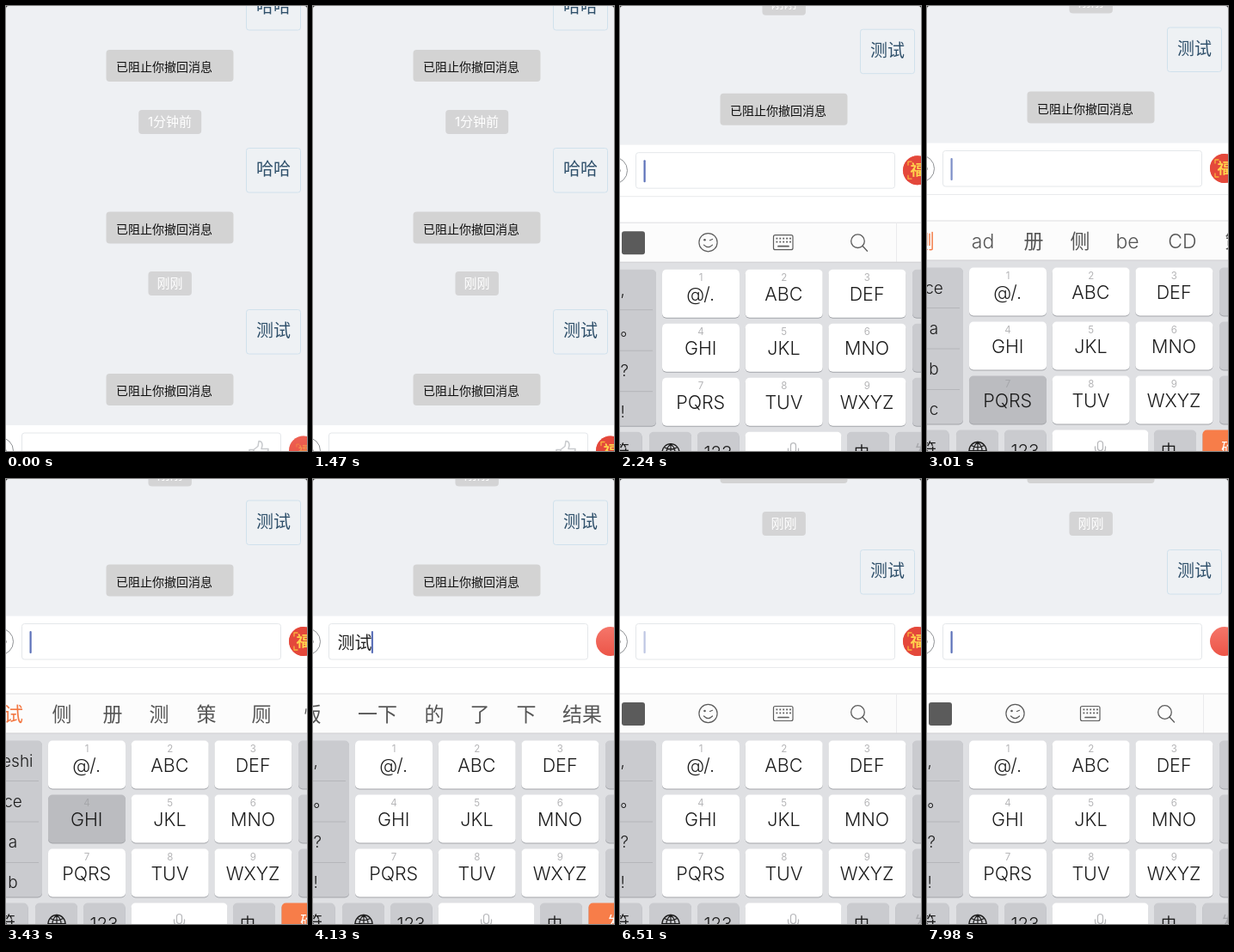
These frames come from a looping animation (350 px wide and 518 px high, 8000 ms). An HTML page:

```html
<!DOCTYPE html>
<html lang="zh-CN">
<head>
<meta charset="utf-8">
<style>
html, body { margin: 0; width: 100%; height: 100%; overflow: hidden; background: #eef0f3; }
svg { display: block; width: 350px; height: 518px; font-family: Inter, "Noto Sans CJK SC", "Noto Sans CJK", sans-serif; }
</style>
</head>
<body>
<svg id="stage" viewBox="0 0 350 518"></svg>
<script>
const LOOP = 8000, FOCUS = 1900, SELECT = 3850, TOOLBAR = 5080, SEND = 5480;
const KEYBOARD_RISE = 328.5, MESSAGE_RISE = 131.5, GLYPH_PERIOD = 3850;
const KEYS = ['@/.', 'ABC', 'DEF', 'GHI', 'JKL', 'MNO', 'PQRS', 'TUV', 'WXYZ'];
const PRESSES = [[2600, 1], [2800, 2], [2990, 6], [3190, 3], [3400, 3]];
const PUNCTUATION = [',', '。', '?', '!'];
const WORD_X = [-3, 65, 124, 178, 233, 297, 358];
const PREDICTIONS = [['版', -2], ['一下', 75], ['的', 141], ['了', 194], ['下', 248], ['结果', 313]];
// Candidate words and side column for each stage of composing
const COMPOSING = [
  { start: 2600, words: ['啊', 'a', '不', '吧', 'b', '才', '次'], side: ['a', 'b', 'c', '2'] },
  { start: 2800, words: ['测', 'ad', '册', '侧', 'be', 'CD', '策'], side: ['ce', 'a', 'b', 'c'] },
  { start: 3100, words: ['测', '册', '侧', '策', '厕', '恻', '側'], side: ['ces', 'ce', 'a', 'b'] },
  { start: 3190, words: ['测试', '侧', '册', '测', '策', '厕', '恻'], side: ['ceshi', 'ce', 'a', 'b'] },
];

const clamp = v => Math.max(0, Math.min(1, v));
const easeOut = (t, start, length) => 1 - (1 - clamp((t - start) / length)) ** 3;
const rect = (x, y, w, h, r, fill, extra = '') =>
  `<rect x="${x}" y="${y}" width="${w}" height="${h}" rx="${r}" fill="${fill}" ${extra}/>`;
const circle = (x, y, r, fill, extra = '') => `<circle cx="${x}" cy="${y}" r="${r}" fill="${fill}" ${extra}/>`;
const path = (d, color, width = 1.3) =>
  `<path d="${d}" fill="none" stroke="${color}" stroke-width="${width}" stroke-linecap="round" stroke-linejoin="round"/>`;
const text = (s, x, y, size, fill, weight = 400, anchor = 'middle') =>
  `<text x="${x}" y="${y}" font-size="${size}" fill="${fill}" font-weight="${weight}" text-anchor="${anchor}">${s}</text>`;
const shift = (y, content) => `<g transform="translate(0 ${y})">${content}</g>`;

const bubble = (s, y) =>
  rect(279.5, y + .5, 63, 51.5, 3, '#eef1f4', 'stroke="#d0e1ec"') + text(s, 311, y + 32, 20, '#2f506b', 350);
const notice = y =>
  rect(116.5, y, 148, 37, 4, '#d3d3d3') + text('已阻止你撤回消息', 128, y + 25, 14, '#111', 400, 'start');
const timeLabel = (s, y, w) =>
  rect(190.7 - w / 2, y, w, 28, 4, '#d4d4d5') + text(s, 190.5, y + 19.3, 15, '#fff');

function chat(t) {
  let out = bubble('哈哈', -24) + notice(51) + timeLabel('1分钟前', 121, 73) + bubble('哈哈', 165)
    + notice(239.5) + timeLabel('刚刚', 309, 50.5) + bubble('测试', 353) + notice(428);
  if (t >= SEND) out += timeLabel('刚刚', 498, 50.5) + bubble('测试', 542);
  return out;
}

function luckyButton(t) {
  const phase = (t - 280 + GLYPH_PERIOD) % GLYPH_PERIOD;
  const shown = Math.min(clamp((phase - 400) / 350), clamp((3760 - phase) / 400));
  return circle(346, 189, 17, 'url(#red)') + circle(346, 189, 17, '#e4483b', `opacity="${shown}"`)
    + `<g transform="translate(346 189) scale(${.5 + .5 * shown})" opacity="${shown}">`
    + text('福', 0, 6.2, 17, '#ffd34d', 700)
    + path('M-11 -6V-10H-7M-11 6V10H-7M7 -10H11V-6M7 10H11V6', '#f9b13c') + '</g>';
}

function cursor(t, x) {
  const reset = t < SELECT ? FOCUS : t < SEND ? SELECT : SEND;
  const phase = (t - reset + 50) % 1000;
  const alpha = Math.min(clamp(phase / 200), clamp((800 - phase) / 150));
  return rect(x, 177, 2.2, 26, 1, '#5d72b9', `opacity="${alpha}"`);
}

function inputBar(t) {
  const typed = t >= SELECT && t < SEND;
  let out = rect(0, 159.5, 350, 90.5, 0, '#fff') + rect(0, 219, 350, 1, 0, '#e9eaec')
    + rect(18.5, 168.5, 301, 41.5, 3, '#fff', 'stroke="#e4e7ea"')
    + circle(-7, 189.3, 15.5, '#fff', 'stroke="#8f9295"') + path('M-1.5 187Q1.5 189.3 -1.5 192', '#777')
    + luckyButton(t);
  if (t < FOCUS) out += path('M283 188H288V202H283ZM288 188L293 184L294 178Q298 178 298 183L297 187H305L303 202H288', '#c8cacd', 1.5);
  if (typed) out += text('测试', 28.5, 198.2, 20, '#222', 350, 'start');
  if (t >= FOCUS) out += cursor(t, typed ? 67.8 : 27.5);
  return out;
}

function tools() {
  const ink = '#5c5c5c';
  let dots = '';
  for (let row = 0; row < 2; row++)
    for (let i = 0; i < 5; i++) dots += rect(181.5 + i * 3.9, 267.5 + row * 4, 1.8, 1.8, 0, ink);
  return rect(2, 260, 27, 27, 3, '#5b5b5b')
    + circle(102.5, 273, 10.6, 'none', `stroke="${ink}" stroke-width="1.2"`)
    + circle(98.5, 270, 1.3, ink) + path('M104.5 270.5L107.5 269.3M97.5 276Q102.5 281 107.5 276', ink, 1.2)
    + rect(178.5, 264.5, 22.5, 17, 2, 'none', `stroke="${ink}" stroke-width="1.2"`) + dots
    + path('M184 277.5H196', ink, 1.7)
    + circle(276.5, 271.5, 7.8, 'none', `stroke="${ink}" stroke-width="1.3"`) + path('M282 277L287.5 283', ink)
    + rect(321, 250, 1, 46, 0, '#ebebed');
}

function suggestions(t, stage) {
  if (stage) return stage.words.map((w, i) => text(w, WORD_X[i], 282, 23, i ? '#555' : '#f37843', 300)).join('');
  if (t >= SELECT && t < TOOLBAR) return PREDICTIONS.map(([w, x]) => text(w, x, 282, 23, '#555', 300)).join('');
  return tools();
}

const key = (x, y, w, h, fill) => rect(x, y + 1, w, h, 5, '#a3a5aa') + rect(x, y, w, h, 5, fill);

function keyboard(t) {
  const gray = '#cacbcf', ink = '#1c1c1c';
  const composing = t >= COMPOSING[0].start && t < SELECT;
  const stage = composing && COMPOSING.filter(s => t >= s.start).pop();
  const press = PRESSES.find(([at]) => t >= at && t < at + 90);
  let out = rect(0, 249.5, 350, 47, 0, '#fcfcfc') + rect(0, 249.5, 350, 1, 0, '#dfe0e2')
    + suggestions(t, stage)
    + rect(0, 296, 350, 222, 0, '#dfe0e3') + rect(0, 295.5, 350, 1, 0, '#cfd0d2');

  KEYS.forEach((label, i) => {
    const x = 49 + i % 3 * 96.7, y = 304.5 + Math.floor(i / 3) * 63;
    const pressed = press && press[1] === i;
    out += key(x, y, 90, 56, pressed ? '#bbbcc0' : '#fff')
      + text(i + 1, x + 45, y + 13.5, 11.5, pressed ? '#a5a6aa' : '#b5b5b7')
      + text(label, x + 44.7, y + 36.3, 21.5, ink, 330);
  });

  out += key(-10, 304.5, 52, 182, gray);
  for (let i = 0; i < 3; i++) {
    out += rect(0, 351 + i * 47.5, 38, 1, 0, '#b5b6ba') + key(340, 304.5 + i * 63, 20, 56, gray);
  }
  (stage ? stage.side : PUNCTUATION).forEach((s, i) =>
    out += text(s, stage ? 8 : .5, 334.5 + i * 47.3, 19, ink, 330, stage ? 'middle' : 'start'));

  const active = t >= COMPOSING[0].start && t < SEND;
  out += key(-10, 493.5, 35.5, 56, gray) + text('符', 1.5, 523, 19, ink, 350)
    + key(34, 493.5, 49, 56, gray)
    + circle(59, 517.5, 10, 'none', `stroke="${ink}" stroke-width="1.3"`)
    + path('M59 507.5V527M49 517.5H69M59 507.5Q49 517 59 527M59 507.5Q69 517 59 527M51.5 511.5Q59 516 66.5 511.5', ink, 1.2)
    + key(90, 493.5, 48.5, 56, gray) + text('123', 114, 525, 20.5, ink, 330)
    + key(145.5, 493.5, 112, 56, '#fff')
    + rect(198.5, 506.5, 6, 11, 3, 'none', 'stroke="#b6b7ba" stroke-width="1.2"')
    + path('M195.5 513V515Q196 520.5 201.5 520.5Q207 520.5 207.5 515V513', '#b6b7ba')
    + key(264, 493.5, 49, 56, gray) + text('中', 281, 523.5, 18, ink, 350)
    + key(320.5, 493.5, 40, 56, active ? '#f77d49' : gray)
    + text(composing ? '确定' : '发送', 342, 522, 18, active ? '#fff' : '#a6a7ab', 400, 'start');
  return out;
}

const defs = `<defs><linearGradient id="red" x2="0" y2="1">
  <stop stop-color="#f5766a"/><stop offset="1" stop-color="#ec5548"/></linearGradient></defs>`;
const stageElement = document.getElementById('stage');
const begin = performance.now();

function draw() {
  const t = (performance.now() - begin) % LOOP;
  const hidden = KEYBOARD_RISE * (1 - easeOut(t, FOCUS, 420));
  const scroll = hidden - KEYBOARD_RISE - MESSAGE_RISE * easeOut(t, SEND, 250);
  stageElement.innerHTML = defs + rect(0, 0, 350, 518, 0, '#eef0f3')
    + shift(scroll, chat(t)) + shift(hidden, inputBar(t) + keyboard(t))
    + '<path d="M0 0H3Q0 0 0 3ZM350 0H347Q350 0 350 3Z" fill="#222"/>';
  requestAnimationFrame(draw);
}
draw();
</script>
</body>
</html>
```
